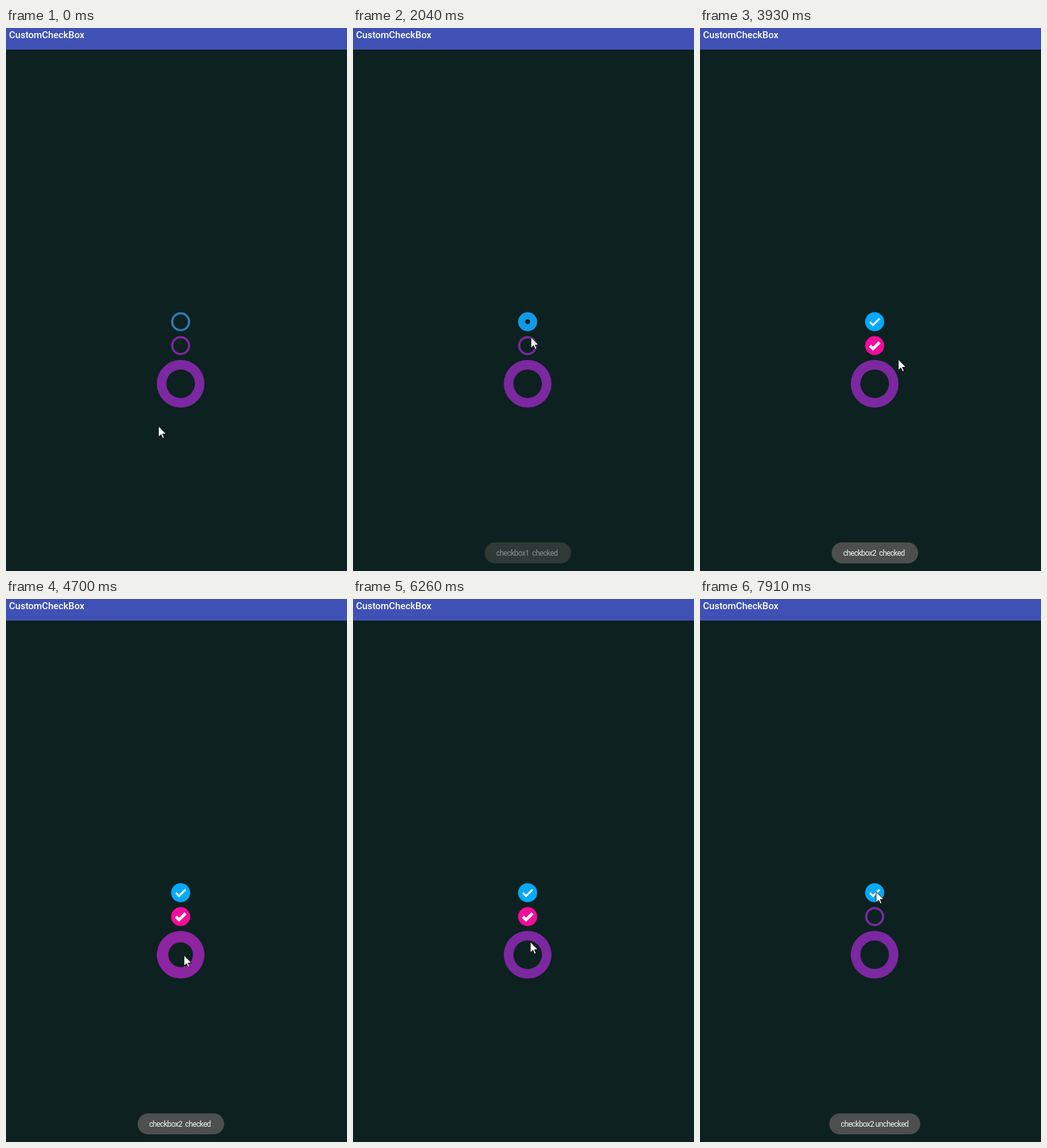
These frames come from a looping animation (536x854 px, 8 s). An HTML page with a canvas:

```html
<!DOCTYPE html>
<html lang="en">
<head>
<meta charset="utf-8">
<title>CustomCheckBox</title>
<style>
  html, body { margin: 0; width: 100%; height: 100%; overflow: hidden; background: #0d2120; }
  canvas { position: absolute; left: 0; top: 0; width: 536px; height: 854px; }
  #bar {
    position: absolute; left: 0; top: 0; width: 536px; height: 34px; background: #3f51b5;
    color: #fff; font: 500 14.9px/22px Roboto, sans-serif; text-indent: 4.7px;
  }
  #toast {
    position: absolute; left: 274.5px; top: 809px; height: 33px; padding: 0 18.5px;
    transform: translateX(-50%); border-radius: 17px; background: #4d4f4e;
    color: #f4f4f4; font: 12px/35px Roboto, sans-serif; letter-spacing: -0.64px; white-space: pre;
  }
</style>
</head>
<body>
<div id="bar">CustomCheckBox</div>
<div id="toast"></div>
<canvas id="stage"></canvas>
<script>
const LOOP = 8000;
const BG = '#0d2120';
const CX = 274.5;
const canvas = document.getElementById('stage');
const ctx = canvas.getContext('2d');
const toast = document.getElementById('toast');
const ratio = window.devicePixelRatio || 1;
canvas.width = 536 * ratio;
canvas.height = 854 * ratio;

const BLUE = [47, 124, 178], SKY = [3, 169, 255];
const PURPLE = [124, 40, 161], PINK = [245, 12, 157];
const boxes = [
  { y: 462, r: 15, ring: 3.5, tick: 2.9, off: BLUE, on: SKY, check: 1817 },
  { y: 499.5, r: 15, ring: 3.5, tick: 4.6, off: PURPLE, on: PINK, check: 3240, uncheck: 7120 },
  { y: 559.5, r: 37.5, ring: 15, tick: 11.5, off: PURPLE, on: PINK, check: 4655, uncheck: 5740 }
];

// Each move eases the pointer to x, y; bow bends the path to the right
const home = { x: 240, y: 626 };
const moves = [
  { from: 340, to: 860, x: 280, y: 482 },
  { from: 1290, to: 1440, x: 277, y: 465 },
  { from: 1880, to: 2130, x: 277, y: 494, bow: 4.3 },
  { from: 3720, to: 4200, x: 280, y: 560, bow: 35 },
  { from: 6130, to: 6460, x: 278, y: 500 },
  { from: 7090, to: 7120, x: 279, y: 491 },
  { from: 7200, to: 7550, x: 278, y: 464 },
  { from: 7840, to: 7910, x: 277, y: 460 }
];

const clamp = v => Math.max(0, Math.min(1, v));
const span = (t, start, length) => clamp((t - start) / length);
const ease = p => p * p * (3 - 2 * p);
const mix = (a, b, p) => a + (b - a) * p;
const blend = (a, b, p) => `rgb(${a.map((v, i) => Math.round(mix(v, b[i], p))).join(',')})`;

function disc(y, r, color) {
  ctx.fillStyle = color;
  ctx.beginPath();
  ctx.arc(CX, y, r, 0, Math.PI * 2);
  ctx.fill();
}

// Two diagonal strokes: a short one down, then a long one up
function drawTick(box, p) {
  const k = box.r / 37.5, short = 12.2 * k, long = 25.5 * k;
  const run = p * (short + long);
  const down = Math.min(run, short), up = run - down;
  const x = CX - 18.5 * k, y = box.y + 0.6 * k;
  ctx.beginPath();
  ctx.moveTo(x, y);
  ctx.lineTo(x + down, y + down);
  if (up > 0) ctx.lineTo(x + down + up, y + down - up);
  ctx.strokeStyle = '#fff';
  ctx.lineWidth = box.tick;
  ctx.stroke();
}

function drawBox(box, t) {
  const off = t >= box.uncheck;
  const fill = off ? 1 - span(t, box.uncheck, 430) : span(t, box.check, 333);
  disc(box.y, box.r, blend(box.off, box.on, fill));
  if (fill < 1) disc(box.y, (box.r - box.ring) * (1 - fill), BG);
  const tick = off ? 0 : span(t, box.check + 500, 90);
  if (tick > 0) drawTick(box, tick);
}

function pointerAt(t) {
  let { x, y } = home;
  for (const m of moves) {
    const p = ease(span(t, m.from, m.to - m.from));
    x = mix(x, m.x, p) + (m.bow || 0) * Math.sin(Math.PI * p);
    y = mix(y, m.y, p);
  }
  return [Math.round(x), Math.round(y)];
}

function drawPointer(t) {
  const [x, y] = pointerAt(t);
  const shape = [[0, 0], [0, 17], [4, 13.2], [6.6, 19], [9, 18], [6.5, 12.2], [12, 12.2]];
  ctx.beginPath();
  for (const [dx, dy] of shape) ctx.lineTo(x - 0.2 + dx, y + 0.3 + dy);
  ctx.closePath();
  ctx.fillStyle = '#fff';
  ctx.fill();
  ctx.strokeStyle = '#000';
  ctx.lineWidth = 0.9;
  ctx.stroke();
}

function drawToast(t) {
  const text = t < 3300 ? 'checkbox1  checked ' : t < 6600 ? 'checkbox2  checked ' : 'checkbox2 unchecked';
  if (toast.textContent !== text) toast.textContent = text;
  const shown = t < 6600
    ? ease(span(t, 1850, 370)) - ease(span(t, 5610, 450))
    : ease(span(t, 7130, 370));
  toast.style.opacity = shown;
}

function draw(t) {
  ctx.setTransform(ratio, 0, 0, ratio, 0, 0);
  ctx.clearRect(0, 0, 536, 854);
  for (const box of boxes) drawBox(box, t);
  drawToast(t);
  drawPointer(t);
}

const start = performance.now();
function frame() {
  draw((performance.now() - start) % LOOP);
  requestAnimationFrame(frame);
}
frame();
</script>
</body>
</html>
```
